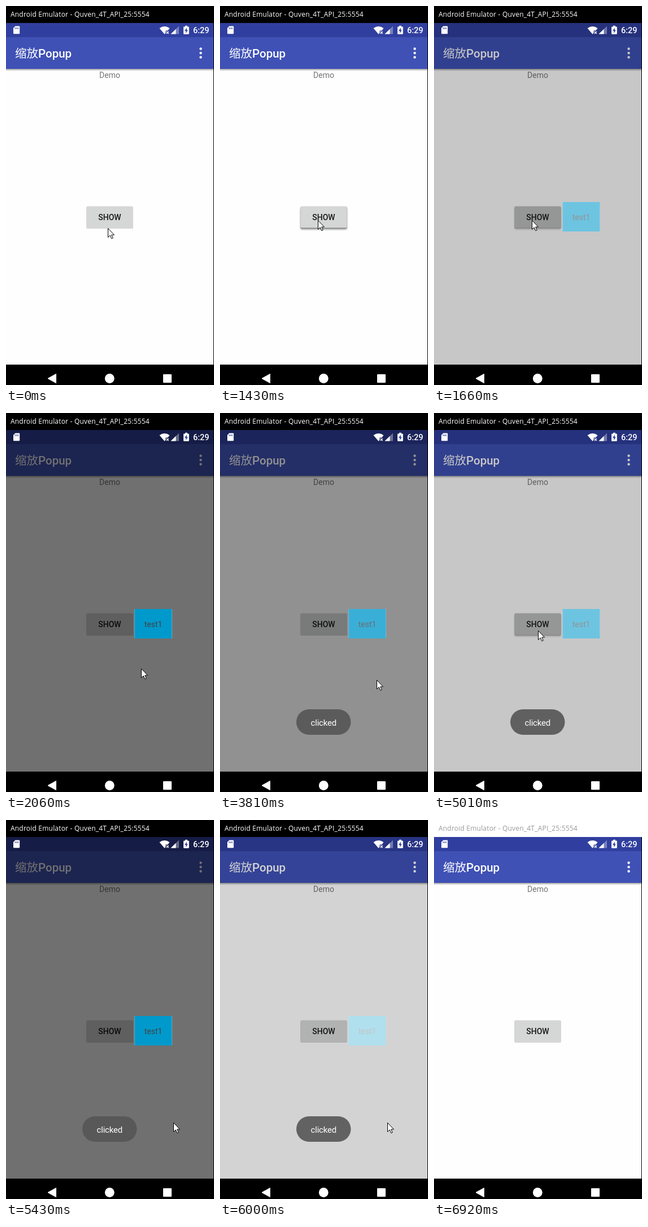
These frames come from a looping animation (368x669 px, 6980 ms). An HTML page:

```html
<!DOCTYPE html>
<html lang="en">
<head>
<meta charset="utf-8">
<title>Popup demo</title>
<style>
html, body { margin: 0; width: 100%; height: 100%; overflow: hidden; background: #000; }
svg { display: block; width: 368px; height: 669px; font-family: Roboto, sans-serif; }
#title { font: 12px "Open Sans", "Noto Sans", sans-serif; letter-spacing: .2px; }
.bar { font-size: 20.5px; fill: #fff; }
.cjk { font-family: "Noto Sans CJK SC", "Noto Sans CJK", sans-serif; }
.med { font-weight: 500; }
.body { font-size: 14px; }
</style>
</head>
<body>
<svg viewBox="0 0 368 669">
  <defs>
    <linearGradient id="drop" x1="0" y1="0" x2="0" y2="1">
      <stop offset="0" stop-opacity=".36"/>
      <stop offset="1" stop-opacity="0"/>
    </linearGradient>
    <filter id="soft" x="-20%" y="-30%" width="140%" height="160%"><feGaussianBlur stdDeviation="1.4"/></filter>
  </defs>

  <rect width="368" height="669"/>
  <rect id="caption" width="368" height="30"/>
  <text id="title" x="8" y="19">Android Emulator - Quven_4T_API_25:5554</text>

  <!-- app window -->
  <rect y="30" width="367" height="603" fill="#fefefe"/>
  <rect y="30" width="367" height="25" fill="#303f9f"/>
  <rect y="55" width="367" height="56" fill="#3f51b5"/>
  <rect y="111" width="367" height="4" fill="url(#drop)"/>
  <text class="bar cjk" x="16" y="91">缩放</text>
  <text class="bar med" x="57" y="91">Popup</text>
  <g fill="#fff">
    <circle cx="344.5" cy="75.5" r="2.2"/>
    <circle cx="344.5" cy="83" r="2.2"/>
    <circle cx="344.5" cy="90.5" r="2.2"/>
  </g>
  <text class="body" x="183.5" y="127" text-anchor="middle" fill="#757575">Demo</text>

  <rect id="raised" x="142.5" y="356" width="82" height="38.5" rx="2" opacity="0" fill-opacity=".4" filter="url(#soft)"/>
  <rect x="142" y="354" width="83" height="39" rx="2" fill-opacity=".16"/>
  <rect x="142.5" y="353.5" width="82" height="38" rx="2" fill="#d5d7d6"/>
  <rect id="ripple" x="142.5" y="353.5" width="82" height="38" rx="2" opacity="0"/>
  <text class="body med" x="183.5" y="378" text-anchor="middle" fill="#161616">SHOW</text>

  <rect id="dim" y="30" width="367" height="603" opacity="0"/>

  <!-- status icons -->
  <g fill="#fff">
    <path d="M16.5 35.5H23.2Q24.2 35.5 24.2 36.5V48.2Q24.2 49.2 23.2 49.2H14Q13 49.2 13 48.2V39Z"/>
    <path d="M16.3 38v2.7M18.8 38v2.7M21.3 38v2.7" stroke="#303f9f" stroke-width="1.2"/>
    <path d="M271.5 39.3Q280.5 32.8 289.5 39.3L286.2 43.5H282.5V47.4L280.5 49.8Z"/>
    <path d="M283.8 45l4 4M287.8 45l-4 4" stroke="#fff" stroke-width="1.3"/>
    <path d="M306 35.5V49.5H291.5Z" opacity=".35"/>
    <path d="M300.5 40.8V49.5H291.5Z"/>
    <path d="M317 34.8h3.8v1.6h2q1 0 1 1V48.8q0 1-1 1h-7.8q-1 0-1-1V37.4q0-1 1-1h2Z"/>
    <path d="M319.8 38.3L316.1 43.9H318.3V47.9L321.8 42.4H319.8Z" fill="#303f9f"/>
    <text class="med" x="331" y="48" font-size="14.5">6:29</text>
  </g>

  <!-- navigation -->
  <g fill="#fff">
    <path d="M74 657.5L88.5 649.5V665.5Z" stroke="#fff" stroke-linejoin="round"/>
    <circle cx="183.3" cy="657.5" r="8.4"/>
    <rect x="278" y="650" width="15" height="15" rx="1"/>
  </g>

  <g id="popup">
    <rect x="227.5" y="346" width="66" height="52" fill="#fefefe"/>
    <g id="card">
      <rect x="227.5" y="346" width="66" height="52" fill="#0099cc"/>
      <text class="body" x="260.5" y="378" text-anchor="middle" fill="#424242">test1</text>
    </g>
  </g>

  <g id="toast" opacity="0">
    <rect x="135" y="523" width="96.5" height="45" rx="22.5" fill="#565656" fill-opacity=".9"/>
    <text x="183.3" y="551.5" text-anchor="middle" fill="#fff" font-size="15" letter-spacing="-.2">clicked</text>
  </g>

  <path id="cursor" d="M.5 .5V16.3L4.2 12.9L6.8 18.6L9.2 17.5L6.7 12H11.5Z" fill="#fff" stroke="#000"/>
</svg>

<script>
const LOOP = 6980, DIM = 0.557;
const $ = id => document.getElementById(id);
const set = (id, name, value) => $(id).setAttribute(name, value);
const clamp = v => Math.max(0, Math.min(1, v));
const ramp = (t, from, to) => clamp((t - from) / (to - from));
const smooth = v => v * v * (3 - 2 * v);

// time, x, y of the pointer tip
const path = [
  [0, 180, 392], [20, 180, 392], [60, 167, 452], [180, 167, 452],
  [620, 173, 378], [1700, 173, 378], [2060, 239, 451], [2120, 240, 450],
  [2150, 240, 450], [2520, 267, 372], [2930, 267, 372], [3250, 277, 471],
  [3870, 277, 471], [4410, 184, 384], [5080, 184, 384], [5430, 296, 534],
  [6030, 296, 534], [6390, 303, 672]
];
const presses = [1430, 4780];
const shows = [{ open: 1570, close: 3810 }, { open: 4920, close: 5920 }];

function pointer(t) {
  const i = path.findIndex(k => k[0] > t);
  if (i < 0) return path[path.length - 1].slice(1);
  const [a, b] = [path[i - 1], path[i]];
  const p = smooth(ramp(t, a[0], b[0]));
  return [a[1] + (b[1] - a[1]) * p, a[2] + (b[2] - a[2]) * p];
}

function popupState(t) {
  const show = shows.find(s => t >= s.open && t < s.close + 200);
  if (!show) return { alpha: 0, dim: 0 };
  if (t >= show.close) {
    const alpha = clamp(0.78 - (t - show.close) / 170);
    return { alpha, dim: DIM * alpha };
  }
  const age = t - show.open;
  return { alpha: clamp(age / 160), dim: DIM * clamp(age / 237) };
}

function draw(t) {
  const inactive = t >= 6920;
  set("caption", "fill", inactive ? "#fff" : "#000");
  set("title", "fill", inactive ? "#999" : "#fff");

  let raised = 0, ripple = 0;
  for (const p of presses) {
    if (t < p) continue;
    raised = 1 - ramp(t, p + 130, p + 330);
    ripple = ramp(t, p, p + 130) * (1 - ramp(t, p + 240, p + 520));
  }
  set("raised", "opacity", raised);
  set("ripple", "opacity", 0.11 * ripple);

  const { alpha, dim } = popupState(t);
  set("dim", "opacity", dim);
  set("popup", "visibility", alpha > 0 ? "visible" : "hidden");
  set("card", "opacity", alpha);

  set("toast", "opacity", ramp(t, 2800, 3120) * (1 - ramp(t, 6060, 6390)));

  const [x, y] = pointer(t);
  set("cursor", "transform", `translate(${Math.round(x)} ${Math.round(y)})`);
}

const start = performance.now();
function tick() {
  draw((performance.now() - start) % LOOP);
  requestAnimationFrame(tick);
}
draw(0);
requestAnimationFrame(tick);
</script>
</body>
</html>
```
